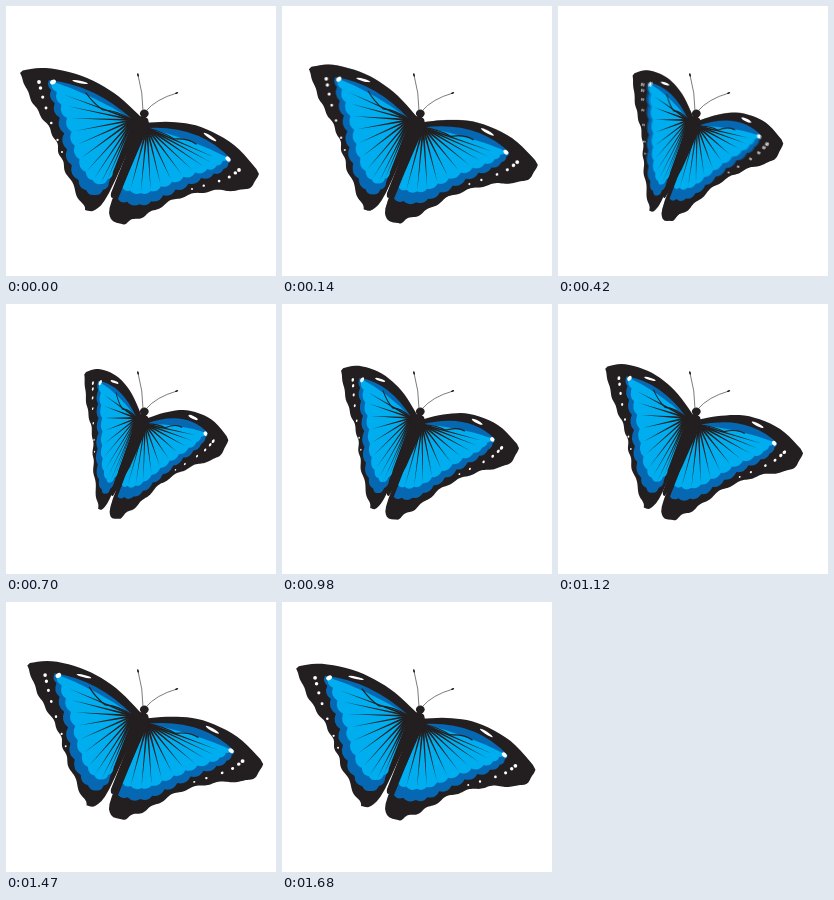
Animation of 270 by 270 pixels, one loop 1750 ms. Source, as an HTML page:

```html
<!DOCTYPE html>
<html lang="en">
<head>
<meta charset="utf-8">
<title>Blue butterfly</title>
<style>
html, body { margin: 0; width: 100%; height: 100%; overflow: hidden; background: #fff; }
svg { display: block; width: 100vw; height: 100vh; }
</style>
</head>
<body>
<svg viewBox="0 0 270 270">
  <defs><g id="left"></g><g id="right"></g></defs>
  <use class="wing" href="#left"/><use class="ghost" href="#left"/>
  <use class="wing" href="#right"/><use class="ghost" href="#right"/>
  <g fill="#231f20">
    <path d="M133 111Q138 108 142 113Q145 121 139 129L124 163L107 192Q104 192 105 187L120 149L128 121Q129 114 133 111Z"/>
    <ellipse cx="138.3" cy="107.5" rx="4.4" ry="4"/>
    <path d="M137 105Q137 87 132 69M140 105Q150 93 171 87" fill="none" stroke="#444" stroke-width=".7"/>
    <ellipse cx="132" cy="69" rx=".9" ry="1.7" transform="rotate(-15 132 69)"/>
    <ellipse cx="170.6" cy="87" rx="1.7" ry=".9" transform="rotate(-20 170.6 87)"/>
  </g>
</svg>
<script>
const BLACK = '#231f20', DARK = '#0668b3', BRIGHT = '#00aeef';
const STEP = 70, LOOP = 1750, RISE = 540, FALL = 600, PEAK = 60.5;

const parse = s => s.split(' ').map(p => p.split(',').map(Number));
const mix = (a, b, k) => a.map((v, i) => v + (b[i] - v) * k);
const range = n => [...Array(n).keys()];

// point at u (0..1) on a smooth curve through the key points
function along(pts, u) {
  const n = pts.length - 1, i = Math.min(n - 1, Math.floor(u * n)), t = u * n - i;
  const [a, b, c, d] = [-1, 0, 1, 2].map(k => pts[Math.max(0, Math.min(n, i + k))]);
  return b.map((v, j) => v + t / 2 * (c[j] - a[j] +
    t * (2 * a[j] - 5 * v + 4 * c[j] - d[j] + t * (3 * v - a[j] - 3 * c[j] + d[j]))));
}

// normal of the curve at u
function normal(pts, u) {
  const [x, y] = along(pts, Math.max(0, u - .01)), [p, q] = along(pts, Math.min(1, u + .01));
  const len = Math.hypot(p - x, q - y);
  return [(q - y) / len, (x - p) / len];
}

const fill = (d, c) => `<path d="${d}" fill="${c}"/>`;
const stroke = (d, w) => `<path d="${d}" fill="none" stroke="${BLACK}" stroke-width="${w}" stroke-linecap="round"/>`;
const mark = (x, y, rx, ry, a) =>
  `<ellipse cx="${x}" cy="${y}" rx="${rx}" ry="${ry}" transform="rotate(${a} ${x} ${y})" fill="#fff"/>`;

function outline({ top, edge, inner }) {
  const upper = range(24).map(i => along(top, i / 24));
  const wavy = range(121).map(i => {
    const u = i / 120, w = 1.3 * Math.sqrt(u) * Math.sin(u * Math.PI * 15), n = normal(edge, u);
    return along(edge, u).map((v, j) => v + n[j] * w);
  });
  const lower = range(13).map(i => along([edge.at(-1), ...inner], i / 12));
  return 'M' + [...upper, ...wavy, ...lower].join('L') + 'Z';
}

// fan of rounded cells; inset pulls the rim toward the root
function fan({ root, rim, side, cells }, ctrl, inset) {
  const at = u => mix(along(rim, u), root, inset(u));
  let d = `M${root}Q${ctrl} ${at(0)}`;
  for (let i = 0; i < cells; i++) {
    const a = at(i / cells), b = at((i + 1) / cells), m = mix(a, b, .5);
    d += `Q${m[0] + (b[1] - a[1]) * side * .4} ${m[1] - (b[0] - a[0]) * side * .4} ${b}`;
  }
  return d + 'Z';
}

// tapering veins between the cells
function veins({ root, rim, cells }) {
  return range(cells - 1).map(i => {
    const end = mix(root, along(rim, (i + 1) / cells), .84);
    const dx = end[0] - root[0], dy = end[1] - root[1], k = 1.1 / Math.hypot(dx, dy);
    const [x, y] = root;
    return fill(`M${x - dy * k} ${y + dx * k}L${end}L${x + dy * k} ${y - dx * k}Z`, BLACK);
  }).join('');
}

function dots({ spots, count }) {
  return range(count).map(i => {
    const u = i / (count - 1), r = 1.9 - .9 * u;
    return mark(...along(spots, u), r, r, 0);
  }).join('');
}

function build(id, w) {
  for (const k of ['top', 'edge', 'inner', 'rim', 'spots']) w[k] = parse(w[k]);
  document.getElementById(id).innerHTML = fill(outline(w), BLACK) +
    fill(fan(w, w.darkTop, () => 0), DARK) +
    fill(fan(w, w.brightTop, u => .03 + .13 * Math.sqrt(u)), BRIGHT) +
    veins(w) + stroke(w.cell, 1.2) + w.marks + dots(w);
}

build('left', {
  top: '135,111 108,87 76,70 40,62 14,65', edge: '14,67 27,97 47,129 59,163 79,204',
  inner: '89,204 103,187 131,125',
  root: [127, 114], rim: '43,74 48,95 57,122 63,151 75,178 90,189 103,176',
  side: -1, cells: 11, darkTop: '89,79', brightTop: '86,88',
  cell: 'M127 114Q110 104 97 104Q87 97 80 87',
  spots: '33,76 40,102 56,146', count: 7,
  marks: mark(47, 76, 3.1, 2.2, -30) + mark(74, 76, 8, 1.2, 12)
});

build('right', {
  top: '137,117 165,116 195,121 228,139 253,166', edge: '253,168 241,183 205,185 170,193 140,209 116,218',
  inner: '105,213 106,194 134,132',
  root: [141, 122], rim: '225,153 216,164 190,174 162,187 136,198 112,193',
  side: 1, cells: 11, darkTop: '193,119', brightTop: '186,133',
  cell: 'M141 122Q158 126 168 133Q182 132 190 138',
  spots: '233,164 219,173 186,183', count: 6,
  marks: mark(204, 131, 7.5, 1.4, 33) + mark(222, 153, 2.9, 2, 45)
});

const wings = [...document.querySelectorAll('.wing')];
const ghosts = [...document.querySelectorAll('.ghost')];
const RAD = Math.PI / 180, LEAN = 12 * RAD;
const hinge = [137, 107], out = [.954, .3], down = [-.3, .954];

// squeeze toward the hinge line plus a shift along it
function fold(scale, shift) {
  const [vx, vy] = [0, 1].map(i => (scale - 1) * out[i] + shift * down[i]);
  const [nx, ny] = out, o = nx * hinge[0] + ny * hinge[1];
  return `matrix(${1 + vx * nx} ${vy * nx} ${vx * ny} ${1 + vy * ny} ${-vx * o} ${-vy * o})`;
}

function pose(pair, deg) {
  const a = deg * RAD, b = a - LEAN;
  pair[0].setAttribute('transform', fold(Math.cos(a), .143 * Math.sin(a)));
  pair[1].setAttribute('transform', fold(Math.cos(b) / Math.cos(LEAN), -.175 * (Math.sin(b) + Math.sin(LEAN))));
}

function angle(t) {
  if (t < FALL) return PEAK * Math.sin(Math.PI / 2 * Math.min(1, t / RISE));
  return PEAK * (1 - Math.min(1, (t - FALL) / 1090) ** 1.5);
}

function draw(now) {
  const t = Math.floor(now % LOOP / STEP) * STEP, deg = angle(t);
  pose(wings, deg);
  pose(ghosts, deg + 1.2);
  ghosts.forEach(g => g.setAttribute('opacity', t > 0 && t < RISE ? .45 : 0));
}

const start = performance.now();
function tick() {
  draw(performance.now() - start);
  requestAnimationFrame(tick);
}
tick();
</script>
</body>
</html>
```
